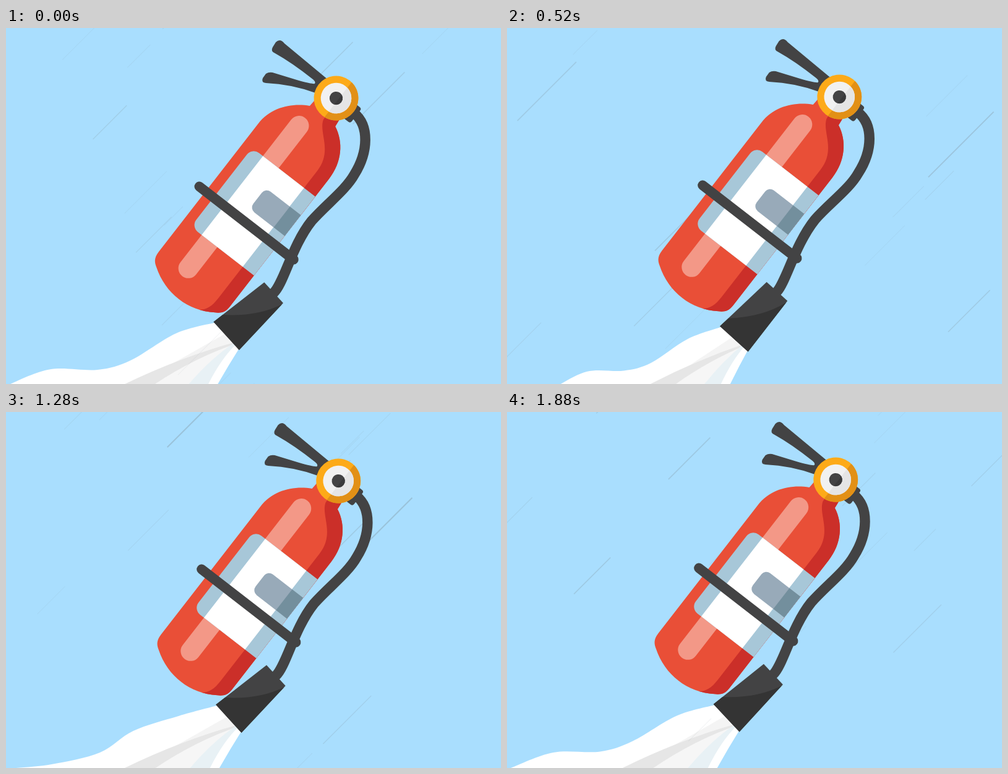
An HTML page with a canvas that plays this animation: 800x576 px, repeating every 1.92 s.

```html
<!DOCTYPE html>
<html lang="en">
<head>
<meta charset="utf-8">
<title>Flying extinguisher</title>
<style>
  html, body { margin: 0; width: 800px; height: 576px; overflow: hidden; background: #a9defe; }
  canvas { display: block; }
</style>
</head>
<body>
<canvas id="stage" width="800" height="576"></canvas>
<script>
const g = document.getElementById('stage').getContext('2d');
const LOOP = 1920, STEP = 40, SWING = 640;
const SKY = '#a9defe', DARK = '#434344', SHADE = '#343434';
const RAD = Math.PI / 180;
const TILT = 37.8 * RAD;
const GAUGE = [533.5, 113.5], PIVOT = [432.7, 428.3];

// shaking of the whole extinguisher: time, x, y
const shakes = [
  [0, 0, 0], [320, 5, -2], [720, 2.5, -2], [960, 1, 1.5],
  [1280, 3.7, -2], [1640, 1.5, -3], [1880, -2.3, -4], [LOOP, 0, 0]
];

// extinguisher body, with the gauge centre as the origin
const bottle = new Path2D('M-25 20L-26 36C-52 50 -74.2 76 -74.2 110V372C-74.2 386 -68 390 -62 394' +
  'C-25 419 22 419 58 394C66 389 71 384 71 372V110C71 76 53 49 27 37L25 20Z');
const bottleShade = new Path2D('M4 20L5 40C12 62 48 70 48 112V372C48 392 44 401 30 410H90V20Z');

const lerp = (a, b, w) => a + (b - a) * w;
const mix = (a, b, w) => a.map((n, i) => lerp(n, b[i], w));
const wave = (t, period) => Math.cos(2 * Math.PI * t / period);

function fill(color, path) {
  g.fillStyle = color;
  path ? g.fill(path) : g.fill();
}

function shape(color, d) {
  fill(color, new Path2D(d));
}

function box(color, x, y, w, h, r = 0) {
  g.beginPath();
  g.roundRect(x, y, w, h, r);
  fill(color);
}

function line(color, width, d) {
  g.strokeStyle = color;
  g.lineWidth = width;
  g.stroke(new Path2D(d));
}

function random(seed) {
  return () => {
    seed = (seed * 1664525 + 1013904223) >>> 0;
    return seed / 4294967296;
  };
}

function shakeAt(t) {
  const i = shakes.findIndex(s => s[0] > t);
  const a = shakes[i - 1], b = shakes[i];
  return mix(a, b, (t - a[0]) / (b[0] - a[0])).slice(1);
}

// smooth curve through points, the pen already at the first
function spline(pts) {
  const at = i => pts[Math.max(0, Math.min(pts.length - 1, i))];
  for (let i = 0; i < pts.length - 1; i++) {
    const [p, a, b, q] = [at(i - 1), at(i), at(i + 1), at(i + 2)];
    g.bezierCurveTo(a[0] + (b[0] - p[0]) / 6, a[1] + (b[1] - p[1]) / 6,
      b[0] - (q[0] - a[0]) / 6, b[1] - (q[1] - a[1]) / 6, b[0], b[1]);
  }
}

// up is 1 when the jet trails to the left and 0 when it points down
function drawFoam(t, up, angle) {
  const sin = Math.sin(angle), cos = Math.cos(angle);
  const tip = (x, y) => [PIVOT[0] + x * cos - y * sin, PIVOT[1] + x * sin + y * cos];
  const ripple = 13 * wave(t - 1280, LOOP);
  const trailing = [[275, 494], [202, 531 - ripple], [148, 553], [70, 559 + ripple], [0, 579]];
  const hanging = [[316, 531], [290, 549], [268, 564], [248, 579], [220, 604]];
  const edge = [tip(-26, 99), ...hanging.map((p, i) => mix(p, trailing[i], up))];
  const right = lerp(392, 340, up), end = tip(28, 99);

  g.beginPath();
  g.moveTo(...edge[0]);
  spline(edge);
  g.lineTo(edge[5][0], 700);
  g.lineTo(right, 700);
  g.lineTo(right, 580);
  g.quadraticCurveTo((right + end[0]) / 2 - 1, (580 + end[1]) / 2, ...end);
  fill('#fff');

  const [x, y] = tip(17, 100);
  const bend = to => `${(x + to) / 2} ${(y + 580) / 2 - 10 * up}`;
  const ray = (color, a, b) =>
    shape(color, `M${x} ${y}Q${bend(a)} ${a} 580V600H${b}V580Q${bend(b)} ${x + 3} ${y + 2}Z`);
  const greyLeft = right - 78 - 78 * up, greyRight = right - 55 - 50 * up;
  const blueLeft = right - 30 - 18 * up;
  shape('#f4f4f4', `M${tip(-3, 99)}L${lerp(x, greyLeft, .55)} ${lerp(y, 580, .55) - 4}L${x} ${y}Z`);
  ray('#f6f6f6', greyRight, blueLeft);
  ray('#e6e6e6', greyLeft, greyRight);
  ray('#e8f1f5', blueLeft, right - 15);
}

// wind rushes by too fast to follow: new streaks at every step, most of them faint
function drawWind(t) {
  const rnd = random(t * 977 + 5);
  rnd();
  g.lineCap = 'butt';
  for (let i = 0; i < 15; i++) {
    const x = rnd() * 820 - 40, y = rnd() * 640;
    const strength = rnd() ** 4, size = 28 + 45 * rnd() + 45 * strength;
    line(`rgba(125,138,145,${.09 + .26 * strength})`, 1 + strength, `M${x} ${y}l${size} ${-size}`);
  }
}

function drawHose(up, angle) {
  const b = 5.5 * (1 - up), [px, py] = PIVOT;
  g.lineCap = 'round';
  line(DARK, 16.5, `M563 138C${587 + b} 158 ${586 + b} 200 ${563 + b / 2} 237` +
    `C${549 + b / 2} 262 518 285 494 312` +
    `C462 352 ${px + 22 * Math.sin(angle)} ${py - 22 * Math.cos(angle)} ${px} ${py}`);
}

function drawNozzle(angle) {
  g.save();
  g.translate(...PIVOT);
  g.rotate(angle);
  shape(DARK, 'M-22.7 0H22.7L30.7 103.7H-30.7Z');
  shape(SHADE, 'M-29.2 85Q10 47 22.9 3L30.7 103.7H-30.7Z');
  g.restore();
}

function drawBottle() {
  g.save();
  g.translate(...GAUGE);
  g.rotate(TILT);
  box(DARK, 20, -12, 23, 30, 4);
  fill('#e94f37', bottle);
  g.save();
  g.clip(bottle);
  fill('#cb2f29', bottleShade);
  g.restore();
  box('#f39887', -36, 56, 32, 324, 16);
  box('#a7c7d8', -58, 146.5, 129, 161.5, [14, 0, 0, 14]);
  box('#fff', -36, 146.5, 84, 161.5);
  box('#98aab9', -1, 184.5, 72, 42.5, [10, 0, 0, 10]);
  box('#738f9d', 48.5, 184.5, 22.5, 42.5);
  g.lineCap = 'round';
  line(DARK, 16, 'M-87 248.5H105.7');
  g.restore();
}

function drawHead() {
  shape(DARK, 'M521 84L450 25Q443 16 436 23L431 31Q427 38 435 41Q462 56 496 83' +
    'Q501 87 499 90Q494 91 470 84L434 73Q426 70 420 74L415 81Q412 88 420 89' +
    'Q462 91 500 105L525 110Z');
  g.save();
  g.translate(...GAUGE);
  g.rotate(TILT);
  const rings = [[36, '#fdaa18', '#e29016'], [24.8, '#f1f1f1', '#e5e5e5'], [10.6, DARK, '#3a3a3b']];
  for (const [r, light, shade] of rings) {
    const a = Math.acos(4 / r);
    g.beginPath();
    g.arc(0, 0, r, 0, 7);
    fill(light);
    g.beginPath();
    g.arc(0, 0, r, -a, a);
    fill(shade);
  }
  g.restore();
}

function draw(now) {
  const t = Math.floor(now % LOOP / STEP) * STEP;
  const up = (1 + wave(t, SWING)) / 2;
  const angle = lerp(30, 47.6, up) * RAD;
  const shake = shakeAt(t);

  g.fillStyle = SKY;
  g.fillRect(0, 0, 800, 576);
  g.save();
  g.translate(...shake);
  drawFoam(t, up, angle);
  g.restore();
  drawWind(t);
  g.save();
  g.translate(...shake);
  drawBottle();
  drawHose(up, angle);
  drawNozzle(angle);
  drawHead();
  g.restore();
}

const start = performance.now();
function tick() {
  draw(performance.now() - start);
  requestAnimationFrame(tick);
}
tick();
</script>
</body>
</html>
```
